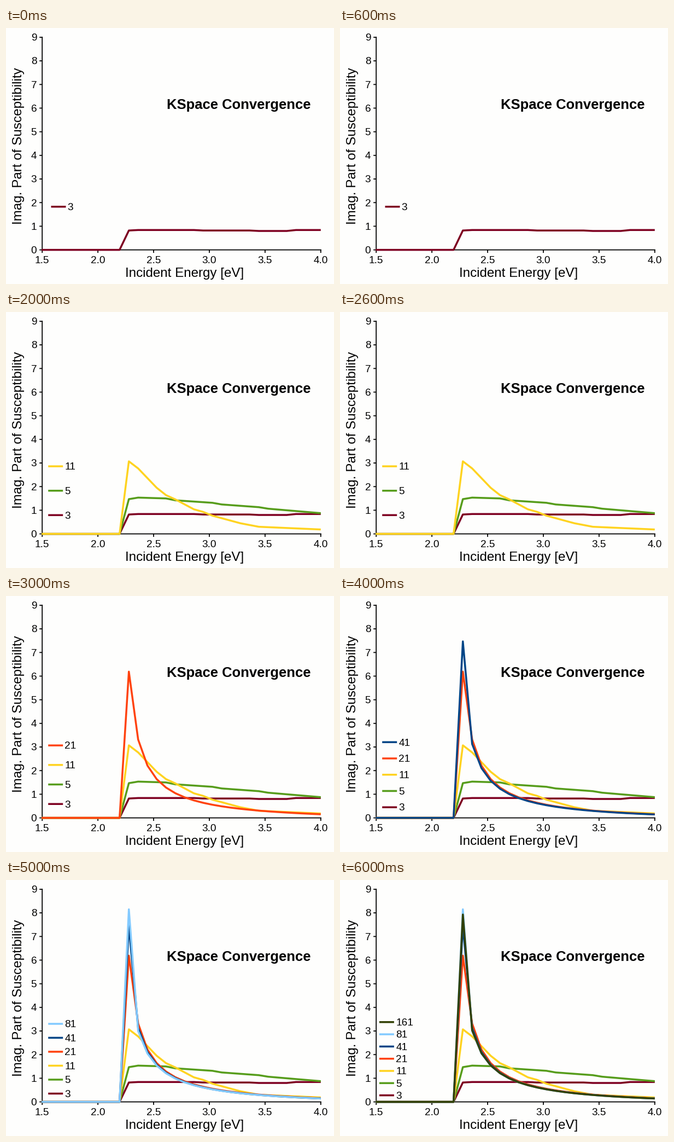
A matplotlib script for the animation above (7000 ms loop, 600 px wide and 468 px high).

```python
import numpy as np
import matplotlib.pyplot as plt
from matplotlib.animation import FuncAnimation

W, H, DPI = 600, 468, 100
PX = 72 / DPI  # points per pixel
LEFT, RIGHT, TOP, BOTTOM = 66.2, 575.8, 16.9, 405.6
LINE = 3.5

plt.rcParams["font.family"] = "Liberation Sans"
plt.rcParams["toolbar"] = "None"

fig = plt.figure(figsize=(W / DPI, H / DPI), dpi=DPI, facecolor="#fefefd")
ax = fig.add_axes([0, 0, 1, 1])
ax.set_xlim(0, W)
ax.set_ylim(H, 0)
ax.axis("off")


def to_x(energy):
    return LEFT + (energy - 1.5) / 2.5 * (RIGHT - LEFT)


def to_y(value):
    return BOTTOM - value / 9 * (BOTTOM - TOP)


def stroke(xs, ys, color="black", width=1.8, **kw):
    return ax.plot(xs, ys, color=color, lw=width * PX, snap=False,
                   solid_capstyle="butt", solid_joinstyle="round", **kw)[0]


def label(x, y, text, size=19, **kw):
    return ax.text(x, y, text, fontsize=size * PX, ha="left", va="baseline",
                   color="black", rotation_mode="anchor", **kw)


# Axes, ticks and titles
stroke([LEFT, LEFT], [TOP - 1, BOTTOM + 1])
stroke([LEFT - 1, RIGHT + 1], [BOTTOM, BOTTOM])
for n in range(10):
    stroke([LEFT - 5, LEFT], [to_y(n)] * 2)
    label(45.7, to_y(n) + 6.4, str(n))
for energy in np.arange(1.5, 4.1, 0.5):
    x = to_x(energy)
    stroke([x, x], [BOTTOM, BOTTOM + 5.5])
    label(x - 13.2, 430.5, f"{energy:.1f}")
label(218, 455.4, "Incident Energy [eV]", 24.15)
label(29, 359, "Imag. Part of Susceptibility", 24.3, rotation=90)
label(294, 148, "KSpace Convergence", 25.6, fontweight="bold")

# Energy steps counted from the absorption peak; the last one ends at 4 eV
STEP = 1 / 12
PEAK = 1.5 + 28 / 36
steps = np.minimum(np.arange(22), (4.0 - PEAK) / STEP)
energies = PEAK + STEP * steps


def bent(points):
    """Straight pieces between (step: value) key points."""
    return np.interp(steps, list(points), list(points.values()))


def decay(peak, scale, offset):
    """Sharp peak followed by a hyperbolic tail."""
    values = scale / (steps + offset) - 0.2
    values[0] = peak
    return values


series = [
    (3, "#7e0021", bent({0: .82, 1: .84, 7: .84, 8: .82, 13: .82,
                         14: .80, 17: .80, 18: .84})),
    (5, "#579d1c", bent({0: 1.47, 1: 1.535, 4: 1.5, 5: 1.42, 9: 1.315,
                         10: 1.245, 14: 1.13, 15: 1.065, 21: .865})),
    (11, "#ffd320", bent({0: 3.07, 1: 2.77, 3: 1.95, 4: 1.64, 5: 1.46,
                          7: 1.04, 8: .93, 9: .77, 12: .45, 14: .30,
                          21: .18})),
    (21, "#ff420e", decay(6.19, 7.7, 1.19)),
    (41, "#004586", decay(7.47, 7.55, 1.27)),
    (81, "#83caff", decay(8.15, 7.55, 1.36)),
    (161, "#314004", decay(7.93, 7.55, 1.34)),
]

curves, keys, names = [], [], []
for count, color, values in series:
    xs = np.concatenate([[LEFT - 1, to_x(PEAK - STEP)], to_x(energies)])
    ys = to_y(np.concatenate([[0, 0], values]))
    curves.append(stroke(xs, ys, color, LINE, zorder=3))
    keys.append(stroke([0, 0], [0, 0], color, LINE))
    names.append(label(0, 0, str(count)))


def update(frame):
    shown = frame + 1
    gap = 178.5 / (shown + 1)
    x = 82.5 - 5.3 * (len(str(series[frame][0])) - 1)
    for i, (curve, key, name) in enumerate(zip(curves, keys, names)):
        for artist in (curve, key, name):
            artist.set_visible(i < shown)
        y = 326.7 + gap * ((shown - 1) / 2 - i)
        key.set_data([x, x + 27], [y, y])
        name.set_position((x + 30.3, y + 6.3))
    return curves + keys + names


anim = FuncAnimation(fig, update, frames=len(series), interval=1000,
                     repeat=True, repeat_delay=0, blit=False)
plt.show()
```
